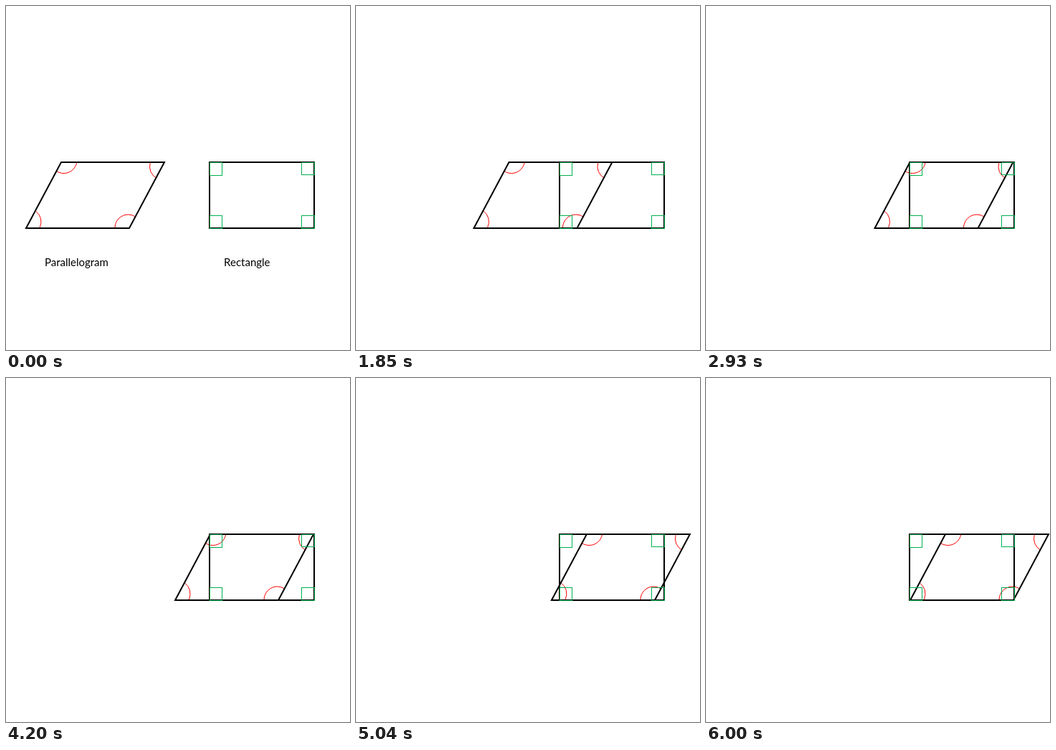
Animation of 480x480 px, one loop 7200 ms. Source, as an HTML page with a canvas:

```html
<!DOCTYPE html>
<html lang="en">
<head>
<meta charset="utf-8">
<title>Parallelogram and rectangle</title>
<style>
html, body { margin: 0; width: 100%; height: 100%; overflow: hidden; background: #fff; }
canvas { display: block; width: 480px; height: 480px; }
</style>
</head>
<body>
<canvas id="stage" width="480" height="480"></canvas>
<script>
const ctx = document.getElementById('stage').getContext('2d');
const LOOP = 7200, STEP = 60, STEPS = 31;
const FIRST = { at: 1130, shift: 207.5 };
const SECOND = { at: 4200, shift: 49.5 };

// Corner arcs of the parallelogram: centre x, centre y, start and end angle
const ARCS = [
  [80.5, 215, 0.16, 2.14],
  [219, 224, 2.08, 3.41],
  [30.5, 301, -0.96, 0.44],
  [170.5, 309.5, Math.PI, 5.28]
];
// Right-angle marks: x, y, width, height
const MARKS = [
  [284.5, 218.5, 17, 18],
  [412.5, 218.5, 18, 17],
  [284.5, 292.5, 17, 18],
  [412.5, 292.5, 18, 18]
];

const bezier = (s, a, b) => 3 * s * (1 - s) ** 2 * a + 3 * s * s * (1 - s) * b + s ** 3;

function ease(p) {
  if (p <= 0 || p >= 1) return p <= 0 ? 0 : 1;
  let lo = 0, hi = 1;
  for (let i = 0; i < 30; i++) {
    const mid = (lo + hi) / 2;
    if (bezier(mid, 0.375, 0.247) < p) lo = mid; else hi = mid;
  }
  return bezier(lo, 0.1, 1);
}

const stepAt = (t, start) =>
  Math.max(0, Math.min(STEPS, Math.floor((t - start) / STEP) + 1));

const travel = (t, move) => move.shift * ease(stepAt(t, move.at) / STEPS);

function pen(color, width) {
  ctx.strokeStyle = color;
  ctx.lineWidth = width;
}

function drawParallelogram(dx) {
  ctx.save();
  ctx.translate(dx, 0);
  pen('#f00', 1);
  for (const [x, y, from, to] of ARCS) {
    ctx.beginPath();
    ctx.arc(x, y, 18.5, from, to);
    ctx.stroke();
  }
  pen('#000', 2);
  ctx.beginPath();
  ctx.moveTo(28, 310);
  ctx.lineTo(77, 218);
  ctx.lineTo(221, 218);
  ctx.lineTo(172, 310);
  ctx.closePath();
  ctx.stroke();
  ctx.restore();
}

function drawRectangle() {
  pen('#000', 2);
  ctx.strokeRect(284, 218, 146, 92);
  pen('#00b050', 1);
  for (const mark of MARKS) ctx.strokeRect(...mark);
}

function drawLabels(alpha) {
  if (alpha <= 0) return;
  ctx.globalAlpha = alpha;
  ctx.fillStyle = '#000';
  ctx.font = '15px Lato, sans-serif';
  ctx.textAlign = 'center';
  ctx.fillText('Parallelogram', 98.4, 363);
  ctx.fillText('Rectangle', 336.3, 363);
  ctx.globalAlpha = 1;
}

function draw(now) {
  const t = now % LOOP;
  ctx.fillStyle = '#fff';
  ctx.fillRect(0, 0, 480, 480);
  drawParallelogram(travel(t, FIRST) + travel(t, SECOND));
  drawRectangle();
  drawLabels(Math.min(1, 1 - (stepAt(t, FIRST.at) - 1) * STEP / 500));
}

const start = performance.now();
function tick() {
  draw(performance.now() - start);
  requestAnimationFrame(tick);
}
tick();
</script>
</body>
</html>
```
